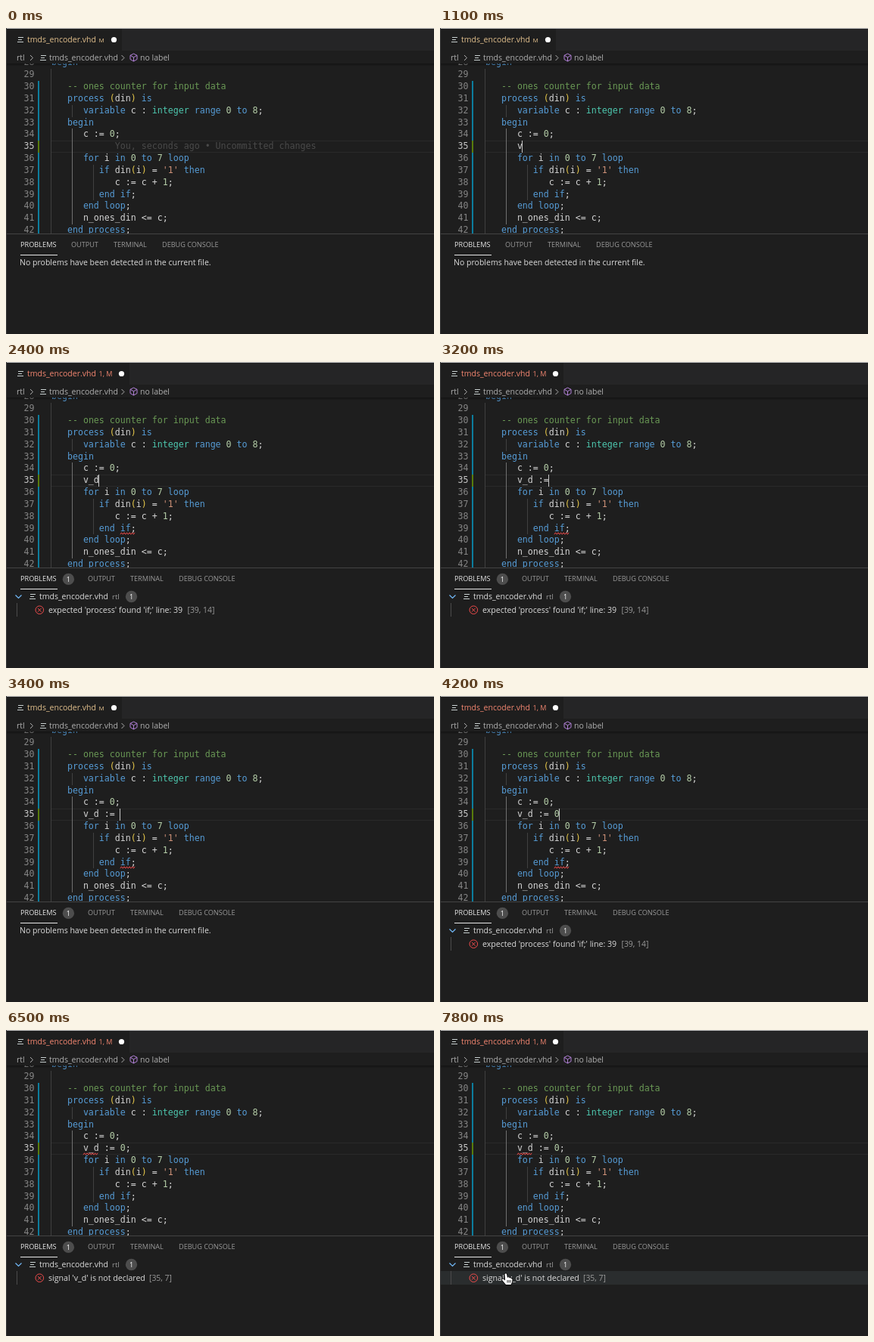
Recreate the animation shown at these times as an HTML page with a canvas. Size 565 px wide and 405 px high, loop 8 s.

```html
<!DOCTYPE html>
<html>
<head>
<meta charset="utf-8">
<style>
html, body { margin: 0; width: 100%; height: 100%; overflow: hidden; background: #1e1e1e; }
canvas { display: block; }
</style>
</head>
<body>
<canvas id="stage" width="565" height="405"></canvas>
<script>
const ctx = document.getElementById('stage').getContext('2d');
const LOOP = 8000, W = 565, H = 405;
const UI = '"Open Sans", sans-serif', MONO = '"DejaVu Sans Mono", monospace';
const CODE_SIZE = 11.61, CHAR = CODE_SIZE * 0.602, LINE = 15.83, LEFT = 59.95;
const RED = '#f14c4c', GREY = '#9a9a9a', LIGHT = '#dcdcdc', CRUMB = '#b0b0b0';

const CODE = [
  'begin', '',
  '   -- ones counter for input data',
  '   process (din) is',
  '      variable c : integer range 0 to 8;',
  '   begin',
  '      c := 0;',
  '',
  '      for i in 0 to 7 loop',
  "         if din(i) = '1' then",
  '            c := c + 1;',
  '         end if;',
  '      end loop;',
  '      n_ones_din <= c;',
  '   end process;'
];
const FIRST = 28, EDITED = 35;
const TOKEN = /--.*|'\d'|\b(?:begin|process|is|variable|range|to|for|in|loop|if|then|end)\b|\binteger\b|\b\d+\b|[()]|[^\s()';]+|[;']/g;
const SUGGESTIONS = ['value', 'variable', 'VT', "'V'", 'new VHDL file template', 'bit_vector', 'real_vector',
  'time_vector', 'to_bit_vector', 'boolean_vector', 'integer_vector', 'std_logic_vector'];
const HINTS = { variable: 'var', 'new VHDL file template': 'nf' };

// [start time, value] lists
const TYPED = [[0, ''], [1100, 'v'], [1400, 'v_'], [2400, 'v_d'], [2800, 'v_d '], [2900, 'v_d :'],
  [3200, 'v_d :='], [3400, 'v_d := '], [4200, 'v_d := 0'], [5000, 'v_d := 0;']];
const CARET = [[0, 0], [300, 1], [800, 0], [1100, 1], [1900, 0], [2400, 1], [3900, 0], [4200, 1],
  [4700, 0], [5000, 1], [5500, 0], [6000, 1], [6500, 0], [7000, 1], [7500, 0]];
const LISTED = [[0, 0], [1300, 1], [3300, 0], [3500, 1]];

const at = (list, t) => list.filter(step => step[0] <= t).pop()[1];
const lineY = n => Math.floor(65.75 + (n - 29) * LINE);
const colX = c => LEFT + c * CHAR;

function rect(x, y, w, h, color) {
  ctx.fillStyle = color;
  ctx.fillRect(x, y, w, h);
}

function text(s, x, y, color, size = 10.5, family = UI, weight = '') {
  ctx.font = `${weight} ${size}px ${family}`;
  ctx.fillStyle = color;
  ctx.fillText(s, x, y);
}

function stroke(points, color, width = 1) {
  ctx.beginPath();
  points.forEach(p => ctx.lineTo(...p));
  ctx.strokeStyle = color;
  ctx.lineWidth = width;
  ctx.stroke();
}

function disc(x, y, r, color) {
  ctx.beginPath();
  ctx.arc(x, y, r, 0, 7);
  ctx.fillStyle = color;
  ctx.fill();
}

function badge(x, y) {
  disc(x, y, 7.7, '#4d4d4d');
  text('1', x - 2.6, y + 3.3, '#ffffff', 9);
}

function fileIcon(x, y) {
  [[1, 7], [1, 5], [0, 8]].forEach(([dx, w], i) => rect(x + dx, y + i * 3, w, 1, '#c8d0d0'));
}

function chevron(x, y) {
  stroke([[x, y - 3.5], [x + 3.5, y], [x, y + 3.5]], CRUMB);
}

function squiggle(x, y, w) {
  const points = [];
  for (let d = 0; d <= w; d += 1.75) points.push([x + d, y + (points.length % 2 ? -1.2 : 1.2)]);
  stroke(points, RED);
}

function tokenColor(s) {
  if (s.startsWith('--')) return '#6a9955';
  if (/^'\d'$/.test(s)) return '#ce9178';
  if (s === 'integer') return '#4ec9b0';
  if (/^\d+$/.test(s)) return '#b5cea8';
  if (/^[()]$/.test(s)) return '#e8c94a';
  return /^(begin|process|is|variable|range|to|for|in|loop|if|then|end)$/.test(s) ? '#569cd6' : '#d4d4d4';
}

function codeLine(s, y) {
  for (const m of s.matchAll(TOKEN)) text(m[0], colX(m.index), y, tokenColor(m[0]), CODE_SIZE, MONO);
}

function header(bad) {
  rect(0, 0, W, 30, '#252526');
  rect(1, 1, bad ? 162 : 152, 30, '#1e1e1e');
  const color = bad ? '#f48771' : '#e2c08d';
  fileIcon(15, 12);
  text('tmds_encoder.vhd', 28, 19, color);
  text(bad ? '1, M' : 'M', 122.5, 19, color, bad ? 9 : 8);
  disc(bad ? 152.5 : 142.5, 15.5, 3.6, '#ffffff');

  text('rtl', 14, 43, CRUMB);
  chevron(32, 39.5);
  fileIcon(45, 36);
  text('tmds_encoder.vhd', 57, 43, CRUMB);
  chevron(152.5, 39.5);
  stroke([[168.5, 34], [173, 36.3], [173, 41.5], [168.5, 44], [164, 41.5], [164, 36.3], [168.5, 34]], '#b180d7');
  stroke([[164, 36.3], [168.5, 38.8], [173, 36.3]], '#b180d7');
  stroke([[168.5, 38.8], [168.5, 44]], '#b180d7');
  text('no label', 177, 43, CRUMB);
}

function editor(t, typed) {
  ctx.save();
  ctx.beginPath();
  ctx.rect(0, 47, W, 225);
  ctx.clip();
  rect(59, 149, W, 1, '#2a2a2a');
  rect(59, 164, W, 1, '#2a2a2a');
  CODE.forEach((source, i) => {
    const n = FIRST + i, y = lineY(n), top = y - 11, height = lineY(n + 1) - y;
    const indent = n === EDITED ? 6 : n === 29 ? 3 : source.search(/\S/);
    for (let c = 0; c < indent; c += 4) {
      rect(Math.floor(colX(c) - 0.5), top, 1, height, c === 4 && n > 33 ? '#707070' : '#404040');
    }
    if (n > 29) rect(42, top, 2, height, n === EDITED ? '#587c0c' : '#0c7d9d');
    text(n, 23.5, y, n === EDITED ? '#c6c6c6' : '#858585', CODE_SIZE, MONO);
    codeLine(n === EDITED ? ' '.repeat(6) + typed : source, y);
  });
  if (t < 1100) text('You, seconds ago • Uncommitted changes', colX(12), lineY(EDITED), '#4a4a4a', CODE_SIZE, MONO);
  if (t >= 5200) squiggle(colX(6), lineY(EDITED) + 4, 3 * CHAR);
  else if (t >= 1300) squiggle(colX(13), lineY(39) + 3, 3 * CHAR);
  if (at(CARET, t)) rect(Math.round(colX(6 + typed.length) - 0.39), 149, 1, 16, '#c4c4c4');
  const shade = ctx.createLinearGradient(0, 47, 0, 51);
  shade.addColorStop(0, '#0005');
  shade.addColorStop(1, '#0000');
  rect(0, 47, W, 4, shade);
  ctx.restore();
}

function panel(t, listed, hover) {
  rect(0, 272, W, 1, '#434343');
  text('PROBLEMS', 19, 290, '#e7e7e7', 9.2);
  rect(19, 300, 49, 1, '#e7e7e7');
  const shift = t >= 1300 ? 22 : 0;
  if (shift) badge(82.4, 287.4);
  [['OUTPUT', 86], ['TERMINAL', 142], ['DEBUG CONSOLE', 206]].forEach(([s, x]) => text(s, x + shift, 290, GREY, 9.1));
  if (!listed) return text('No problems have been detected in the current file.', 18, 314, LIGHT, 10.53);

  if (hover) rect(1, hover === 1 ? 301 : 319, W, 18, '#2a2d2e');
  stroke([[12.5, 308.5], [16.5, 312.5], [20.5, 308.5]], '#75beff', 1.1);
  fileIcon(31, 307);
  text('tmds_encoder.vhd', 44, 314, LIGHT);
  text('rtl', 140, 314, GREY, 9.5);
  badge(165.5, 310.5);
  rect(14, 319, 1, 18, '#4b4b4b');
  ctx.beginPath();
  ctx.arc(44.3, 328.2, 5.3, 0, 7);
  ctx.strokeStyle = RED;
  ctx.lineWidth = 1;
  ctx.stroke();
  stroke([[42, 326], [46.6, 330.6]], RED);
  stroke([[46.6, 326], [42, 330.6]], RED);
  const fresh = t >= 5300;
  text(fresh ? "signal 'v_d' is not declared" : "expected 'process' found 'if;' line: 39", 56, 332, LIGHT, 10.6);
  text(fresh ? '[35, 7]' : '[39, 14]', fresh ? 189 : 239.5, 332, GREY, 10.4);
}

function suggestIcon(i, y) {
  if (i === 1 || i === 4 || i === 12) {
    ctx.setLineDash([2, 1]);
    ctx.strokeStyle = '#c5c5c5';
    ctx.lineWidth = 1;
    ctx.strokeRect(113.5, Math.round(y) - 4.5, 10, 9);
    ctx.setLineDash([]);
  } else {
    text('abc', 112, y + 2.8, '#c5c5c5', 7.6);
  }
}

function popup() {
  ctx.save();
  ctx.beginPath();
  ctx.rect(109, 165, 360, 194);
  ctx.clip();
  rect(109, 165, 360, 194, '#454545');
  rect(110, 166, 358, 192, '#252526');
  rect(110, 166, 358, 15.5, '#094771');
  SUGGESTIONS.forEach((s, i) => {
    const y = 173.3 + i * LINE, base = Math.floor(y + 3.8), hit = s.search(/v/i);
    suggestIcon(i, y);
    [...s].forEach((ch, k) => {
      const match = k === hit;
      text(ch, 128 + k * CHAR, base, match ? '#18a3ff' : '#d4d4d4', CODE_SIZE, MONO, match ? 'bold' : '');
    });
    if (HINTS[s]) {
      ctx.textAlign = 'right';
      text(HINTS[s], 460, base, '#929292', 10.3, MONO);
      ctx.textAlign = 'left';
    }
  });
  suggestIcon(12, 361.5);
  rect(460, 166, 8, 144, '#79797950');
  rect(109, 358, 360, 1, '#454545');
  ctx.restore();
}

function pointer(x, y, hand) {
  const shape = hand
    ? 'M4.5 1Q6 -.5 7 1L8 6 9 5Q10.5 5 11 6.5 12 5.5 13 7 14.5 6.5 14.5 8.5L14 12 12.5 15H6L1 9Q.5 7 2.5 7.5L5 9.5Z'
    : 'M0 0V14L3.4 11 5.6 16 8 15 5.8 10.2H10Z';
  ctx.save();
  ctx.translate(x - (hand ? 5 : 0), y);
  const path = new Path2D(shape);
  ctx.lineJoin = 'round';
  ctx.strokeStyle = '#000';
  ctx.lineWidth = 1.6;
  ctx.fillStyle = '#fff';
  ctx.stroke(path);
  ctx.fill(path);
  if (hand) [8, 10, 12].forEach(dx => stroke([[dx, 9], [dx, 12.5]], '#000', 0.8));
  ctx.restore();
}

function draw(t) {
  const listed = at(LISTED, t);
  const left = 1 - Math.min(1, (Math.floor(t / 100) * 100 - 7200) / 600);
  const ease = left ** 2;
  const mx = 86 + 420 * ease, my = 322 + 60 * ease;
  const moving = t >= 7200;
  const hover = !moving || my > 337 ? 0 : my < 319 ? 1 : 2;

  rect(0, 0, W, H, '#1e1e1e');
  editor(t, at(TYPED, t));
  header(listed);
  panel(t, listed, hover);
  if (t >= 1200 && t < 1400) popup();
  rect(0, 0, W, 1, '#c0c0c0');
  rect(0, 0, 1, H, '#3c3c3c');
  if (moving) pointer(mx, my, hover > 0);
}

const start = performance.now();
function tick() {
  draw((performance.now() - start) % LOOP);
  requestAnimationFrame(tick);
}
tick();
</script>
</body>
</html>
```
